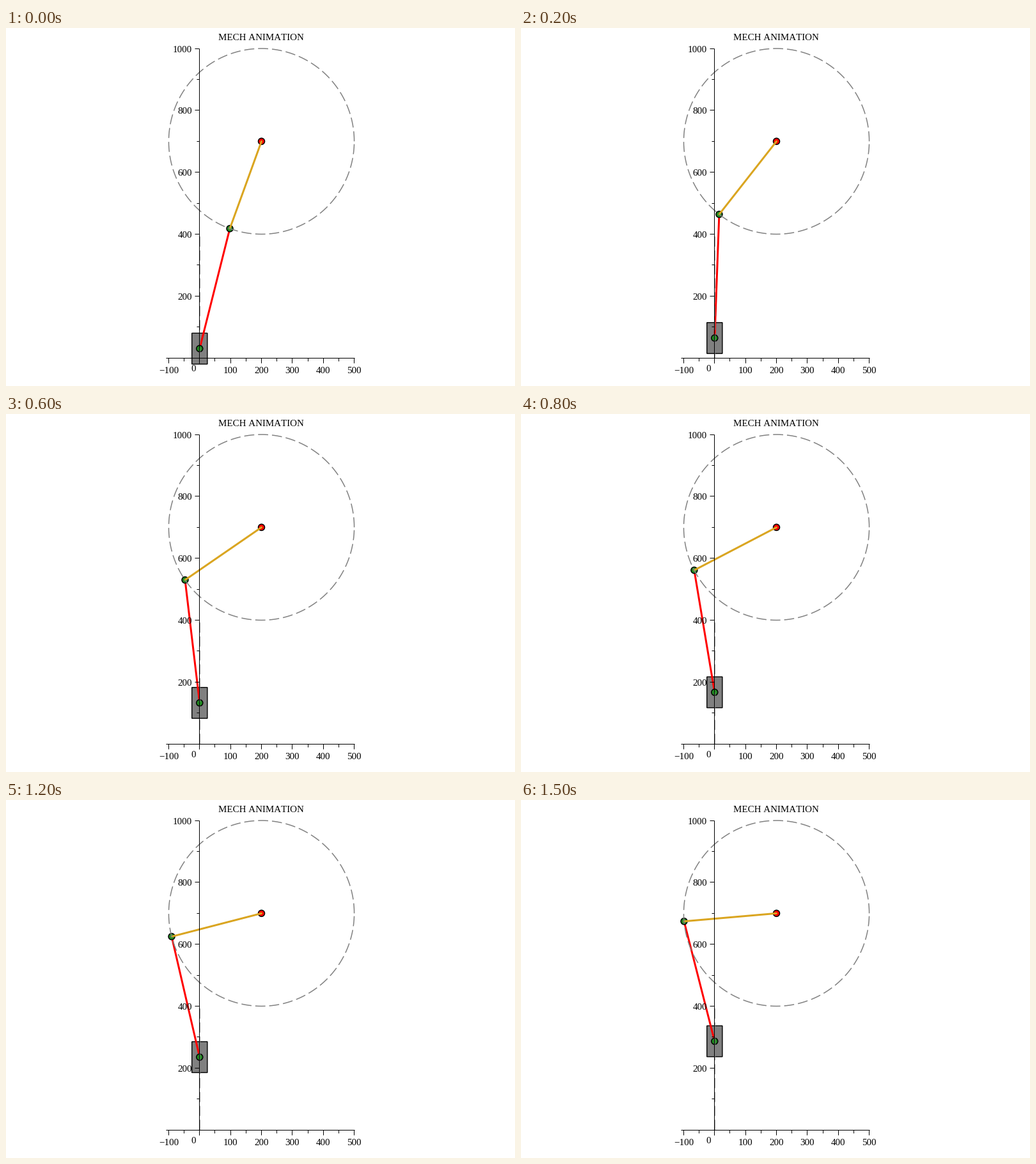
Animation of 796 by 560 pixels, one loop 1600 ms. Source, as a matplotlib script:

```python
import numpy as np
import matplotlib.pyplot as plt
from matplotlib.animation import FuncAnimation
from matplotlib.patches import Circle, Rectangle

W, H, DPI = 796, 560, 64
PT = 72 / DPI                      # points per pixel
FRAMES, INTERVAL = 16, 100
CRANK, ROD = 300, 400
CENTER = np.array([200.0, 700.0])

plt.rcParams["font.family"] = "Liberation Serif"
plt.rcParams["text.kerning_factor"] = 6    # practically no kerning
fig = plt.figure(figsize=(W / DPI, H / DPI), dpi=DPI, facecolor="white")
ax = fig.add_axes([0, 0, 1, 1])
ax.set_xlim(0, W)
ax.set_ylim(H, 0)
ax.axis("off")


def px(x):
    return 302.8 + 0.4836 * x


def py(y):
    return 516.1 - 0.484 * y


def hairline(x0, y0, x1, y1):
    ax.plot(np.floor([x0, x1]), np.floor([y0, y1]), color="black",
            lw=PT, solid_capstyle="butt", zorder=8)


def label(x, y, text, ha="center"):
    ax.text(x, y, text, size=15 * PT, ha=ha, va="baseline", zorder=9)


def bar(color, z):
    return ax.plot([], [], color=color, lw=3 * PT,
                   solid_capstyle="round", zorder=z)[0]


def joint(color, z):
    return ax.add_patch(Circle((0, 0), 5, fc=color, ec="black",
                               lw=1.5 * PT, zorder=z))


def draw_axes():
    x_line, y_line = px(0), py(0)
    hairline(250, y_line, px(500) + 1, y_line)
    hairline(x_line, py(1000), x_line, 524)
    for x in range(-100, 501, 50):
        major = x % 100 == 0
        hairline(px(x), y_line, px(x), y_line + (8 if major else 5))
        if major and x:
            label(px(x), 540, str(x).replace("-", "\u2212"))
    label(293, 537, "0")
    for y in range(100, 1001, 100):
        major = y % 200 == 0
        hairline(x_line - (7 if major else 4), py(y), x_line, py(y))
        if major:
            label(290.8, py(y) + 5.5, str(y), "right")
    label(398.8, 19, "MECH ANIMATION")


def draw_guides():
    a = np.linspace(0, 2 * np.pi, 361)
    style = dict(color="#808080", lw=1.5 * PT, dashes=(10.5, 4),
                 dash_capstyle="butt", zorder=6)
    ax.plot(px(CENTER[0] + CRANK * np.cos(a)),
            py(CENTER[1] + CRANK * np.sin(a)), **style)
    ax.plot([px(0)] * 2, [py(0), py(400)], **style)
    hairline(297, py(0), 341, py(0))


def crank_pin(slider_y):
    """Left-hand meeting point of the rod and crank circles."""
    start = np.array([0.0, slider_y])
    span = CENTER - start
    d = np.hypot(*span)
    u = span / d
    along = (d**2 + ROD**2 - CRANK**2) / (2 * d)
    side = np.sqrt(max(ROD**2 - along**2, 0))
    return start + along * u + side * np.array([-u[1], u[0]])


draw_axes()
draw_guides()
block = ax.add_patch(Rectangle((px(-25), 0), px(25) - px(-25), py(0) - py(100),
                               fc="#808080", ec="black", lw=1.4 * PT,
                               snap=False, zorder=2))
rod = bar("#ff0000", 3)
slider_pin = joint("#228b22", 4)
elbow = joint("#228b22", 4)
pivot = joint("#ff0000", 4)
pivot.center = px(CENTER[0]), py(CENTER[1])
crank = bar("#daa520", 5)


def update(i):
    y = 30.1 + 17.1 * i
    x_pin, y_pin = crank_pin(y)
    pin = px(x_pin), py(y_pin)
    block.set_y(py(y + 50))
    slider_pin.center = px(0), py(y)
    elbow.center = pin
    rod.set_data([px(0), pin[0]], [py(y), pin[1]])
    crank.set_data([pin[0], px(CENTER[0])], [pin[1], py(CENTER[1])])
    return block, rod, slider_pin, elbow, crank


anim = FuncAnimation(fig, update, frames=FRAMES, interval=INTERVAL,
                     repeat=True, repeat_delay=0, blit=False)
plt.show()
```
